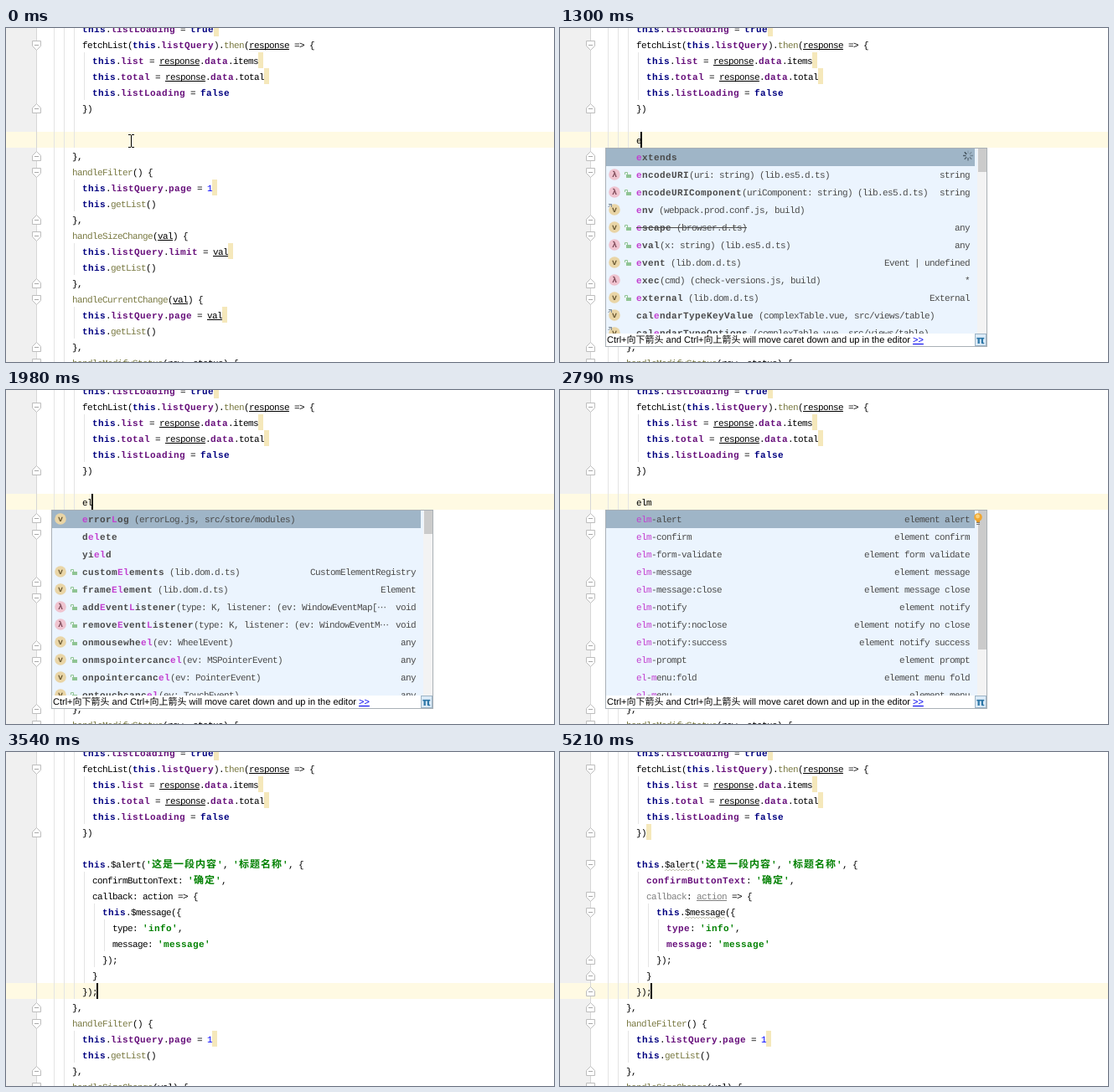
An HTML page for the animation above (5460 ms loop, 654 px wide and 399 px high).

```html
<!DOCTYPE html>
<html lang="en">
<head>
<meta charset="utf-8">
<title>Editor live template</title>
<style>
html, body { margin: 0; width: 100%; height: 100%; overflow: hidden; background: #fff; }
svg { display: block; width: 100vw; height: 100vh; }
text { white-space: pre; font: 11px "Liberation Mono", "Noto Sans Mono", monospace; text-rendering: geometricPrecision; }
.r { letter-spacing: var(--r); }
.b { letter-spacing: var(--b); font-weight: bold; }
.cjk { font: 12px "Noto Sans CJK SC", "Noto Sans CJK", sans-serif; letter-spacing: 0; }
.b.cjk { font-weight: bold; letter-spacing: 1px; }
.hint { font: 11px "Liberation Sans", "Noto Sans CJK SC", "Noto Sans CJK", sans-serif; }
</style>
</head>
<body>
<svg id="stage" viewBox="0 0 654 399" xml:space="preserve"></svg>
<script>
const LOOP = 5460, ROW = 19, END = LOOP;
const stage = document.getElementById('stage');
const rowY = r => 10 + ROW * r;

// style code: [colour, bold, underlined]
const STYLES = {
  p: ['#000'], k: ['#000080', 1], f: ['#660e7a', 1], s: ['#008000', 1],
  m: ['#7a7a43'], n: ['#0000ff'], u: ['#000', 0, 1],
  g: ['#808080'], a: ['#808080', 0, 1],
  d: ['#4a4a4a'], B: ['#4a4a4a', 1], H: ['#c23fd0', 1], h: ['#c23fd0']
};

// Fix the pitch: 6px regular, 7px bold
function pitch(weight, px) {
  stage.innerHTML = `<text style="font-weight:${weight}">${'x'.repeat(100)}</text>`;
  return px - stage.firstChild.getComputedTextLength() / 100 + 'px';
}
const spacing = [pitch('normal', 6), pitch('bold', 7)];
stage.style.setProperty('--r', spacing[0]);
stage.style.setProperty('--b', spacing[1]);

const rect = (x, y, w, h, fill) => `<rect x="${x}" y="${y}" width="${w}" height="${h}" fill="${fill}"/>`;
const path = (d, stroke, fill = 'none') => `<path d="${d}" stroke="${stroke}" fill="${fill}"/>`;
const move = (x, y, body) => `<g transform="translate(${x} ${y})">${body}</g>`;
const during = (on, off, body) => `<g data-on="${on}" data-off="${off}">${body}</g>`;

function wave(x, y, w) {
  let d = `M${x} ${y + 2}`;
  for (let i = 0; i < w; i += 4) d += 'l2 -2l2 2';
  return path(d, '#c4c4b4');
}

// Markup: ‹code|text›; everything else takes the plain style
function write(x, base, src, plain = 'p') {
  let out = '';
  for (const [, code, marked, bare] of src.matchAll(/‹(\w)\|([^›]*)›|([^‹]+)/g)) {
    const [fill, bold, underlined] = STYLES[code || plain];
    const left = x;
    for (const run of (marked ?? bare).match(/[\u4e00-\u9fff]+|[^\u4e00-\u9fff]+/g)) {
      const cjk = run >= '\u4e00';
      out += `<text class="${bold ? 'b' : 'r'}${cjk ? ' cjk' : ''}" x="${x}" y="${base}" fill="${fill}">${run}</text>`;
      x += run.length * ((cjk ? 12 : 6) + (bold ? 1 : 0));
    }
    if (underlined) out += rect(left, base + 1, x - left, 1, fill);
  }
  return { out, end: x };
}

// One code line; warn adds the tan cell behind its end
function line(r, x, src, warn) {
  const { out, end } = write(x, rowY(r) + 14, src);
  return (warn ? rect(end, rowY(r), 6, ROW, '#f5e8bb') : '') + out;
}

const guide = (x, from, to) => rect(x, from, 1, to - from, '#e4e4e4');
const fold = (r, open) => {
  const y = rowY(r);
  const shape = open ? `M31.5 ${y + 5.5}h10v6l-5 5l-5 -5z` : `M31.5 ${y + 15.5}h10v-6l-5 -5l-5 5z`;
  return path(shape, '#bdbdbd', '#fff') + rect(34, y + 10, 5, 1, '#a8a8a8');
};
const current = r => rect(0, rowY(r), 654, ROW, '#fffae3');
const caret = (x, r) => rect(x, rowY(r), 2, ROW, '#000');
const beam = (x, y) => move(x, y, path('M0 .5h3M4 .5h3M3.5 1v14M0 15.5h3M4 15.5h3', '#000'));
const bulb = (x, y) => move(x, y,
  '<circle cx="5" cy="5" r="4.8" fill="#f0a732"/><circle cx="4.5" cy="4" r="2.4" fill="#fbd27c"/>' +
  rect(3, 9, 4, 2, '#e09a2c') + rect(3, 11, 4, 1, '#777') + rect(3, 13, 4, 1, '#777'));

// Handlers below the edited function
function handlers() {
  let out = '';
  for (const r of [9, 13, 17]) out += guide(81, rowY(r), rowY(r + 2));
  for (const r of [7, 11, 15, 19]) out += fold(r, false) + fold(r + 1, true) + line(r, 79, '},');
  for (const r of [10, 14, 18]) out += line(r, 91, '‹k|this›.‹m|getList›()');
  return out +
    line(8, 79, '‹m|handleFilter›() {') +
    line(9, 91, '‹k|this›.‹f|listQuery›.‹f|page› = ‹n|1›', true) +
    line(12, 79, '‹m|handleSizeChange›(‹u|val›) {') +
    line(13, 91, '‹k|this›.‹f|listQuery›.‹f|limit› = ‹u|val›', true) +
    line(16, 79, '‹m|handleCurrentChange›(‹u|val›) {') +
    line(17, 91, '‹k|this›.‹f|listQuery›.‹f|page› = ‹u|val›', true) +
    line(20, 79, '‹m|handleModifyStatus›(‹u|row›, ‹u|status›) {');
}

const upper =
  guide(93, 29, 86) + fold(0, true) + fold(4, false) +
  line(-1, 91, '‹k|this›.‹f|listLoading› = ‹k|true›', true) +
  line(0, 91, 'fetchList(‹k|this›.‹f|listQuery›).‹m|then›(‹u|response› => {') +
  line(1, 103, '‹k|this›.‹f|list› = ‹u|response›.‹f|data›.items', true) +
  line(2, 103, '‹k|this›.‹f|total› = ‹u|response›.‹f|data›.total', true) +
  line(3, 103, '‹k|this›.‹f|listLoading› = ‹k|false›') +
  during(0, 3830, line(4, 91, '})')) + during(3830, END, line(4, 91, '})', true));

// Object keys are plain until the highlighter has run
const keys = code =>
  line(7, 103, `‹${code}|confirmButtonText›: ‹s|'确定'›,`) +
  line(10, 127, `‹${code}|type›: ‹s|'info'›,`) +
  line(11, 127, `‹${code}|message›: ‹s|'message'›`);

const snippet =
  guide(81, 143, 295) +
  during(3540, END, guide(93, 143, 276) + guide(105, 181, 257) + guide(117, 200, 238)) +
  line(6, 91, "‹k|this›.$alert(‹s|'这是一段内容'›, ‹s|'标题名称'›, {") +
  during(3380, 3690, keys('p') + line(8, 103, 'callback: action => {')) +
  during(3690, END, keys('f') + wave(125, 140, 36) + wave(149, 197, 48)) +
  during(3690, 3830, line(8, 103, 'callback: ‹u|action› => {')) +
  during(3830, END, line(8, 103, '‹g|callback›: ‹a|action› => {')) +
  line(9, 115, '‹k|this›.$message({') +
  line(12, 115, '});') + line(13, 103, '}') + line(14, 91, '});');

// Completion rows: [flags, label, type]; + unlocked, ^ local, - deprecated
const ERROR_LOG = ['v', '‹H|e›‹B|rrorLog› (errorLog.js, src/store/modules)', ''];
const LIST_E = [
  ['', '‹H|e›‹B|xtends›', ''],
  ['λ+', '‹H|e›‹B|ncodeURI›(uri: string) (lib.es5.d.ts)', 'string'],
  ['λ+', '‹H|e›‹B|ncodeURIComponent›(uriComponent: string) (lib.es5.d.ts)', 'string'],
  ['v^', '‹H|e›‹B|nv› (webpack.prod.conf.js, build)', ''],
  ['v+-', '‹H|e›‹B|scape› (browser.d.ts)', 'any'],
  ['λ+', '‹H|e›‹B|val›(x: string) (lib.es5.d.ts)', 'any'],
  ['v+', '‹H|e›‹B|vent› (lib.dom.d.ts)', 'Event | undefined'],
  ['λ', '‹H|e›‹B|xec›(cmd) (check-versions.js, build)', '*'],
  ['v+', '‹H|e›‹B|xternal› (lib.dom.d.ts)', 'External'],
  ['v^', '‹B|cal›‹H|e›‹B|ndarTypeKeyValue› (complexTable.vue, src/views/table)', ''],
  ['v^', '‹B|cal›‹H|e›‹B|ndarTypeOptions› (complexTable.vue, src/views/table)', '']
];
const LIST_EL = [
  ['v', '‹H|e›‹B|rror›‹H|L›‹B|og› (errorLog.js, src/store/modules)', ''],
  ['', '‹B|d›‹H|el›‹B|ete›', ''],
  ['', '‹B|yi›‹H|el›‹B|d›', ''],
  ['v+', '‹B|custom›‹H|El›‹B|ements› (lib.dom.d.ts)', 'CustomElementRegistry'],
  ['v+', '‹B|frame›‹H|El›‹B|ement› (lib.dom.d.ts)', 'Element'],
  ['λ+', '‹B|add›‹H|E›‹B|vent›‹H|L›‹B|istener›(type: K, listener: (ev: WindowEventMap[⋯', 'void'],
  ['λ+', '‹B|remove›‹H|E›‹B|vent›‹H|L›‹B|istener›(type: K, listener: (ev: WindowEventM⋯', 'void'],
  ['v+', '‹B|onmousewhe›‹H|el›(ev: WheelEvent)'.replace('whe›', 'whe›'), 'any'],
  ['v+', '‹B|onmspointercanc›‹H|el›(ev: MSPointerEvent)', 'any'],
  ['v+', '‹B|onpointercanc›‹H|el›(ev: PointerEvent)', 'any'],
  ['v+', '‹B|ontouchcanc›‹H|el›(ev: TouchEvent)', 'any']
];
LIST_EL[7][1] = '‹B|onmousewhe›‹H|el›(ev: WheelEvent)'.replace('whe›', 'whe›');

const template = name => {
  const label = name.startsWith('elm') ? '‹h|elm›' + name.slice(3) : '‹h|el›-‹h|m›' + name.slice(4);
  const type = name.replace(/^elm?/, 'element').replace(/[-:]/g, ' ').replace('noclose', 'no close');
  return ['', label, type];
};
const LIST_ELM = ['elm-alert', 'elm-confirm', 'elm-form-validate', 'elm-message', 'elm-message:close',
  'elm-notify', 'elm-notify:noclose', 'elm-notify:success', 'elm-prompt', 'el-menu:fold', 'el-menu'].map(template);

function icon(flags, y) {
  let out = '';
  if (flags) {
    const lambda = flags[0] === 'λ';
    out += `<circle cx="65" cy="${y}" r="6.8" fill="${lambda ? '#efc3cf' : '#e9d5a6'}"/>` +
      `<text x="65" y="${y + 3}" text-anchor="middle" fill="${lambda ? '#7d4a58' : '#6b5a35'}" style="font-size:10px;font-weight:bold">${flags[0]}</text>`;
  }
  if (flags.includes('+')) out += rect(79, y, 6, 4, '#8fc493') + path(`M77.5 ${y}v-2.5h3v2.5`, '#8fc493');
  if (flags.includes('^')) out += path(`M57.5 ${y - 3}l4 -4M58 ${y - 6.5}h3.5v3.5`, '#7d8a96');
  return out;
}

function rows(list) {
  let out = rect(55, 144, 440, 21, '#9fb5c7');
  list.slice(0, 11).forEach(([flags, label, type], i) => {
    const base = 158 + 21 * i;
    const text = write(91, base, label, 'd');
    out += icon(flags, base - 4) + text.out;
    if (flags.includes('-')) out += rect(91, base - 4, text.end - 91, 1, '#4a4a4a');
    if (type) out += write(489 - 6 * type.length, base, type, 'd').out;
  });
  return out;
}

function spinner(turn) {
  let out = '';
  for (let i = 0; i < 8; i++) {
    out += `<path d="M0 -2.5V-6" transform="rotate(${45 * (i + turn)})" stroke="#33404a" stroke-width="1.4" opacity="${(i + 2) / 10}"/>`;
  }
  return move(487, 152.5, out);
}

const popup =
  rect(54, 143, 456, 238, '#a9b0b6') + rect(55, 144, 443, 221, '#ebf4fe') + rect(498, 144, 11, 221, '#f3f3f3') +
  during(1300, 2110, rect(499, 144, 10, 28, '#cbcbcb')) +
  during(2110, 3220, rect(499, 144, 10, 166, '#cbcbcb')) +
  during(1300, 1680, rows(LIST_E)) +
  during(1680, 1980, rows([ERROR_LOG, ...LIST_E])) +
  during(1980, 2110, rows(LIST_EL)) +
  during(2110, 3220, rows(LIST_ELM)) +
  [1300, 1440, 1560].map((on, i, all) => during(on, all[i + 1] || 1680, spinner(i))).join('') +
  rect(55, 365, 454, 15, '#fff') +
  '<text class="hint" x="56" y="376">Ctrl+向下箭头 and Ctrl+向上箭头 will move caret down and up in the editor</text>' +
  '<text class="hint" x="421" y="376" fill="#0000ee" text-decoration="underline">&gt;&gt;</text>' +
  '<rect x="495.5" y="365.5" width="13" height="14" fill="#dcebf7" stroke="#9db4c6"/>' +
  '<text x="502" y="377" text-anchor="middle" fill="#2f78a8" style="font:bold 13px \'DejaVu Sans\',sans-serif">π</text>';

const typed = [[1160, 1830, 'e'], [1830, 2110, 'el'], [2110, 3380, 'elm']];
const carets = [[440, 840, 90, 6], [1160, 1830, 96, 6], [1830, 2110, 102, 6], [2110, 2670, 108, 6], [3380, END, 108, 14]];
const beams = [[0, 1160, 146, 127], [4630, 4790, 211, 182], [4790, 4940, 340, 267], [4940, 5080, 429, 317], [5080, 5210, 578, 376]];
const lateFolds = [[6, true], [8, true], [9, true], [12, false], [13, false], [14, false]];

stage.innerHTML =
  rect(0, 0, 654, 399, '#fff') + rect(0, 0, 36, 399, '#f0f0f0') +
  during(0, 3380, current(6)) + during(3380, END, current(14)) +
  rect(36, 0, 1, 399, '#d6d6d6') +
  guide(57, 0, 399) + guide(69, 0, 399) + guide(81, 0, 143) +
  upper +
  during(0, 3380, handlers()) +
  during(3380, END, move(0, 8 * ROW, handlers()) + snippet) +
  during(5210, END, lateFolds.map(f => fold(...f)).join('')) +
  typed.map(([on, off, s]) => during(on, off, line(6, 91, s))).join('') +
  carets.map(([on, off, ...at]) => during(on, off, caret(...at))).join('') +
  during(1300, 3220, popup) +
  during(2790, 3220, bulb(494, 147)) + during(4510, 5210, bulb(52, 275)) +
  beams.map(([on, off, ...at]) => during(on, off, beam(...at))).join('');

const timed = [...stage.querySelectorAll('[data-on]')].map(el => ({ el, on: +el.dataset.on, off: +el.dataset.off }));
const began = performance.now();

function tick() {
  const t = (performance.now() - began) % LOOP;
  for (const { el, on, off } of timed) el.style.display = t >= on && t < off ? '' : 'none';
  requestAnimationFrame(tick);
}
tick();
</script>
</body>
</html>
```
